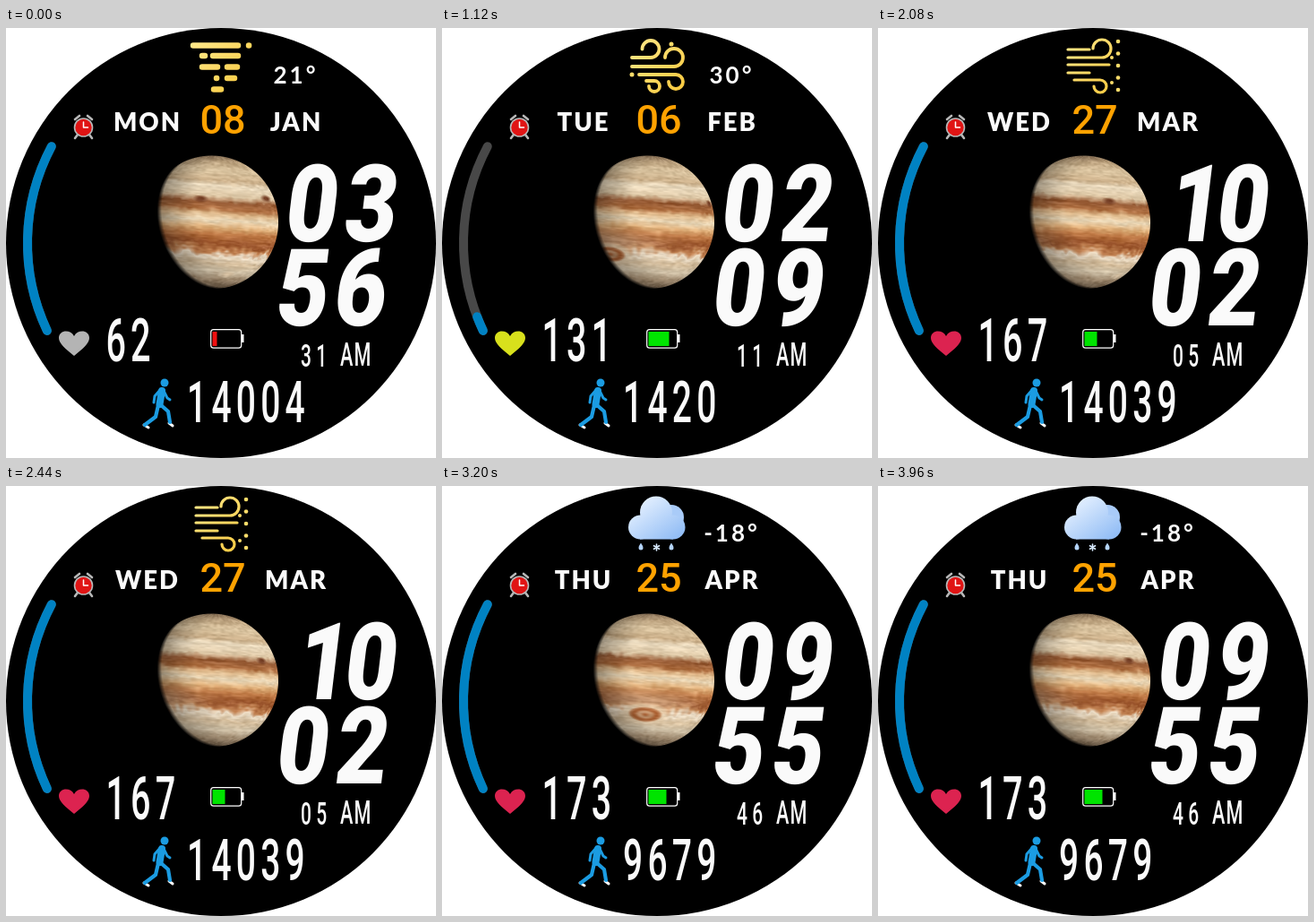
Animation, 480 px wide and 480 px high, one loop 4 s. Source, as an HTML page with a canvas:

```html
<!DOCTYPE html>
<html lang="en">
<head>
<meta charset="utf-8">
<title>Watch face</title>
<style>
  html, body { margin: 0; width: 100%; height: 100%; overflow: hidden; background: #fff; }
  canvas { display: block; width: 480px; height: 480px; }
</style>
</head>
<body>
<canvas id="face" width="480" height="480"></canvas>
<script>
const ctx = document.getElementById('face').getContext('2d');
const LOOP = 4000, TICK = 40, SPIN_STEPS = 40, SPIN = 0.054;
const BLUE = '#0082c3', SKIN = '#1b9ce2', WHITE = '#fafafa', NARROW = 0.6, WIDE = 0.84;

const screens = [
  { day: 'MON', date: '08', month: 'JAN', temp: '21°', icon: fog, hour: '03', minute: '56', second: '31',
    pulse: '62', heart: '#b4b4b4', steps: '14004', goal: 1, charge: 5, power: '#f01010' },
  { day: 'TUE', date: '06', month: 'FEB', temp: '30°', icon: wind, hour: '02', minute: '09', second: '11',
    pulse: '131', heart: '#d8e01c', steps: '1420', goal: 0.08, charge: 23, power: '#00e400' },
  { day: 'WED', date: '27', month: 'MAR', temp: '', icon: gusts, hour: '10', minute: '02', second: '05',
    pulse: '167', heart: '#dc2350', steps: '14039', goal: 1, charge: 14, power: '#00e400' },
  { day: 'THU', date: '25', month: 'APR', temp: '-18°', icon: sleet, hour: '09', minute: '55', second: '46',
    pulse: '173', heart: '#dc2350', steps: '9679', goal: 1, charge: 20, power: '#00e400' }
];

// ---------- drawing helpers ----------
function stroke(path, color, width) {
  ctx.strokeStyle = color;
  ctx.lineWidth = width;
  ctx.lineCap = ctx.lineJoin = 'round';
  ctx.stroke(new Path2D(path));
}
function fill(path, color) {
  ctx.fillStyle = color;
  ctx.fill(new Path2D(path));
}
function dot(x, y, r, color) {
  ctx.fillStyle = color;
  ctx.beginPath();
  ctx.arc(x, y, r, 0, 7);
  ctx.fill();
}
function text(str, x, y, font, color = WHITE, spacing = 0, align = 'center') {
  ctx.font = font;
  ctx.fillStyle = color;
  ctx.textAlign = align;
  ctx.letterSpacing = spacing + 'px';
  ctx.fillText(str, x + (align === 'center' ? spacing / 2 : 0), y);
}
function narrowText(str, x, y, size, spacing) {
  ctx.save();
  ctx.translate(x, y);
  ctx.scale(NARROW, 1);
  text(str, 0, 0, `500 ${size}px Roboto, sans-serif`, WHITE, spacing, 'left');
  ctx.restore();
}
// Heavy slanted digits, each aligned by its right edge
function bigDigits(str, right, baseline) {
  [...str].forEach((digit, i) => {
    ctx.save();
    ctx.transform(WIDE, 0, -0.12, 1, right + i * 66, baseline);
    ctx.font = '900 120px Roboto, sans-serif';
    ctx.letterSpacing = '0px';
    ctx.textAlign = 'left';
    ctx.fillStyle = WHITE;
    ctx.fillText(digit, -ctx.measureText(digit).actualBoundingBoxRight, 0);
    ctx.restore();
  });
}

// ---------- planet ----------
const bands = [
  [-1, 140, 114, 86], [-.9, 190, 164, 128], [-.77, 218, 196, 160], [-.64, 200, 172, 134],
  [-.55, 232, 216, 188], [-.4, 226, 204, 170], [-.31, 150, 90, 52], [-.21, 176, 112, 66],
  [-.14, 222, 184, 138], [-.04, 238, 220, 188], [.08, 220, 172, 118], [.17, 190, 120, 68],
  [.31, 154, 84, 44], [.39, 190, 126, 78], [.49, 234, 220, 198], [.6, 212, 188, 154],
  [.72, 228, 212, 184], [.84, 190, 164, 132], [1, 124, 102, 78]
];
const CREAM = [236, 212, 178], RUST = [178, 104, 58], DARK = [116, 62, 36];
const SUN = [.64, -.224, .736], TILT = 0.07;
const clamp = v => Math.max(0, Math.min(1, v));
const mix = (a, b, k) => a.map((v, i) => v + (b[i] - v) * k);

function hash(x, y) {
  const s = Math.sin(x * 127.1 + y * 311.7) * 43758.5453;
  return s - Math.floor(s);
}
function noise(x, y) {
  const ix = Math.floor(x), iy = Math.floor(y), smooth = t => t * t * (3 - 2 * t);
  const fx = smooth(x - ix), fy = smooth(y - iy);
  const row = j => hash(ix, j) * (1 - fx) + hash(ix + 1, j) * fx;
  return row(iy) * (1 - fy) + row(iy + 1) * fy - 0.5;
}
function bandColor(y) {
  let i = 1;
  while (i < bands.length - 1 && bands[i][0] < y) i++;
  const [y0, ...a] = bands[i - 1], [y1, ...b] = bands[i];
  return mix(a, b, clamp((y - y0) / (y1 - y0)));
}
function surface(lon, y) {
  const spot = lon + (SPIN_STEPS - 1) * SPIN;
  const rough = 0.5 + Math.exp(-(((y - .4) / .14) ** 2));
  const warped = y + rough * (0.06 * noise(lon * 5, y * 9) + 0.07 * noise(lon * 14 + 9, y * 22));
  let color = bandColor(warped);
  const calm = Math.exp(-((spot / .8) ** 2)) * Math.exp(-(((y - .32) / .16) ** 2));
  color = mix(color, CREAM, calm * 0.5);

  const q = Math.hypot(spot / .29, (y - .51) / .11);
  color = mix(color, CREAM, 0.7 * clamp((1.6 - q) * 3));
  color = mix(color, mix(CREAM, RUST, 0.75 + 0.25 * Math.cos(q * 9)), clamp((1.08 - q) * 6));
  for (const [l, v, w, tone] of [[-.2, -.34, .09, DARK], [1.04, -.41, .12, DARK], [.47, .76, .13, CREAM]])
    color = mix(color, tone, clamp(1.5 - Math.hypot((lon - l) / w, (y - v) / .04)));

  const streak = 24 * noise(lon * 3, y * 34) + 24 * noise(lon * 11, y * 50);
  return color.map(v => v + streak);
}

const area = { x: 152, y: 138, w: 156, h: 157 };
const pixels = ctx.createImageData(area.w, area.h);
let drawnSpin = -1;
function planet(spin) {
  if (spin !== drawnSpin) {
    drawnSpin = spin;
    for (let j = 0, p = 0; j < area.h; j++) {
      for (let i = 0; i < area.w; i++, p += 4) {
        const x = (area.x + i - 229) / 75, y = (area.y + j - 216.5) / 75;
        const r = Math.hypot(x, y), edge = clamp((1 - r) * 75);
        pixels.data[p + 3] = 255;
        let color = [0, 0, 0];
        if (edge) {
          const z = Math.sqrt(1 - r * r);
          const sun = x * SUN[0] + y * SUN[1] + z * SUN[2];
          const light = edge * clamp((sun + .07) * 9) * Math.min(1, 0.64 + 0.6 * sun);
          if (light) color = surface(Math.atan2(x + TILT * y, z) - spin * SPIN, y - TILT * x).map(v => v * light);
        }
        pixels.data.set(color, p);
      }
    }
  }
  ctx.putImageData(pixels, area.x, area.y);
}

// ---------- weather icons ----------
function gold() {
  const g = ctx.createLinearGradient(210, 12, 270, 72);
  g.addColorStop(0, '#ffe98c');
  g.addColorStop(1, '#f8c83c');
  return g;
}
function fog() {
  stroke('M209 19.5H259M271 19.5h.1M219 31h3M231 31H259M219 43.5H236M247 43.5H258' +
         'M235 56h.1M247 56H255M232 68.5H240', gold(), 6.5);
}
function wind() {
  stroke('M212 33H233a9.500 9.500 0 1 0-9.500-9.500M212 43H259a10 10 0 1 0-10-10' +
         'M220 52H261a8 8 0 1 1-8 8M228 59H237a6 6 0 1 1-6 6', gold(), 3.8);
  for (const [x, y] of [[256, 18], [212, 52]]) dot(x, y, 2.5, '#fbdc6a');
}
function gusts() {
  stroke('M212 24H236M212 33H250a10 10 0 1 0-10-10M212 41H258M212 50H236' +
         'M219 58H248a7 7 0 1 1-7 7', gold(), 3.2);
  for (let i = 0; i < 5; i++) dot(268, 15 + i * 13.5, 2.3, '#fbdc6a');
  dot(261, 33, 2, '#fbdc6a');
  dot(261, 61, 2, '#fbdc6a');
}
function sleet() {
  const sky = ctx.createLinearGradient(222, 14, 256, 62);
  sky.addColorStop(0, '#e6f1ff');
  sky.addColorStop(1, '#92bdf5');
  dot(256, 35, 14, '#a9cbf8');
  dot(239, 29.5, 18, sky);
  dot(258, 46, 13.5, sky);
  dot(221.5, 46, 13.5, sky);
  fill('M221 36H258V59.500H221z', sky);
  for (const x of [222, 256])
    fill(`M${x} 63.500q-2.500 3.500-2.500 5.500a2.500 2.500 0 0 0 5 0q0-2-2.500-5.500`, '#b4d4fb');
  stroke('M239.500 65v7M236.500 66.700l6 3.600M242.500 66.700l-6 3.600', '#d8eaff', 1.6);
}

// ---------- fixed and data-driven parts ----------
function alarm() {
  stroke('M80 119l-3 4M93 119l3 4M77 102l5-4M96 102l-5-4', '#b8b8b8', 2.6);
  dot(86.5, 111, 10.8, '#b8b8b8');
  dot(86.5, 111, 9.2, '#e01414');
  stroke('M86.500 105V111H91.500', '#fff', 1.5);
}
function runner() {
  stroke('M154 443l5 3M182 441l4 3', '#fff', 3);
  dot(177, 396, 4.5, SKIN);
  stroke('M174 405L171.500 420', SKIN, 8);
  stroke('M172 404L166 411L165 418M176 405L180 413L183 415', SKIN, 3);
  stroke('M173 421L181 428L183 440M170 421L167 434L155 443', SKIN, 4.2);
}
function goalArc(part) {
  const start = 2.702, end = 3.629;
  const arc = (to, color) => {
    ctx.beginPath();
    ctx.arc(254, 240, 230, start, to);
    ctx.strokeStyle = color;
    ctx.lineWidth = 10;
    ctx.lineCap = 'round';
    ctx.stroke();
  };
  arc(end, '#484848');
  arc(start + (end - start) * part, BLUE);
}
function battery(width, color) {
  ctx.strokeStyle = '#fff';
  ctx.lineWidth = 1.2;
  ctx.beginPath();
  ctx.roundRect(228.7, 336.7, 34, 20.5, 3);
  ctx.stroke();
  fill('M263 342h2.500v9h-2.500z', '#fff');
  ctx.fillStyle = color;
  ctx.fillRect(230.5, 339, width, 16);
}

function draw(time) {
  const tick = Math.floor(time % LOOP / TICK);
  const s = screens[Math.floor(tick * TICK / 1000)];
  ctx.fillStyle = '#fff';
  ctx.fillRect(0, 0, 480, 480);
  dot(240, 240, 240, '#000');
  planet(Math.max(0, tick - 1) % SPIN_STEPS);

  s.icon();
  text(s.temp, 322, 62, '700 26px Lato, sans-serif', WHITE, 3);
  alarm();
  text(s.day, 157, 115, '900 27.5px Lato, sans-serif', WHITE, 2);
  text(s.date, 242, 118, '500 45px Roboto, sans-serif', '#ffa200');
  text(s.month, 323, 115, '900 27.5px Lato, sans-serif', WHITE, 2);

  bigDigits(s.hour, 363, 238);
  bigDigits(s.minute, 353, 332);
  narrowText(s.second, 329, 378, 35, 9);
  narrowText('AM', 373, 376.5, 36, 2);

  goalArc(s.goal);
  fill('M76 366C66 358 59 352 59 346C59 337 72 336 76 344C80 336 93 337 93 346C93 352 86 358 76 366', s.heart);
  narrowText(s.pulse, 111.5, 372, 66, 8.5);
  battery(s.charge, s.power);
  runner();
  narrowText(s.steps, 202, 440, 65, 8.7);
}

function frame() {
  draw(performance.now());
  requestAnimationFrame(frame);
}
frame();
</script>
</body>
</html>
```
